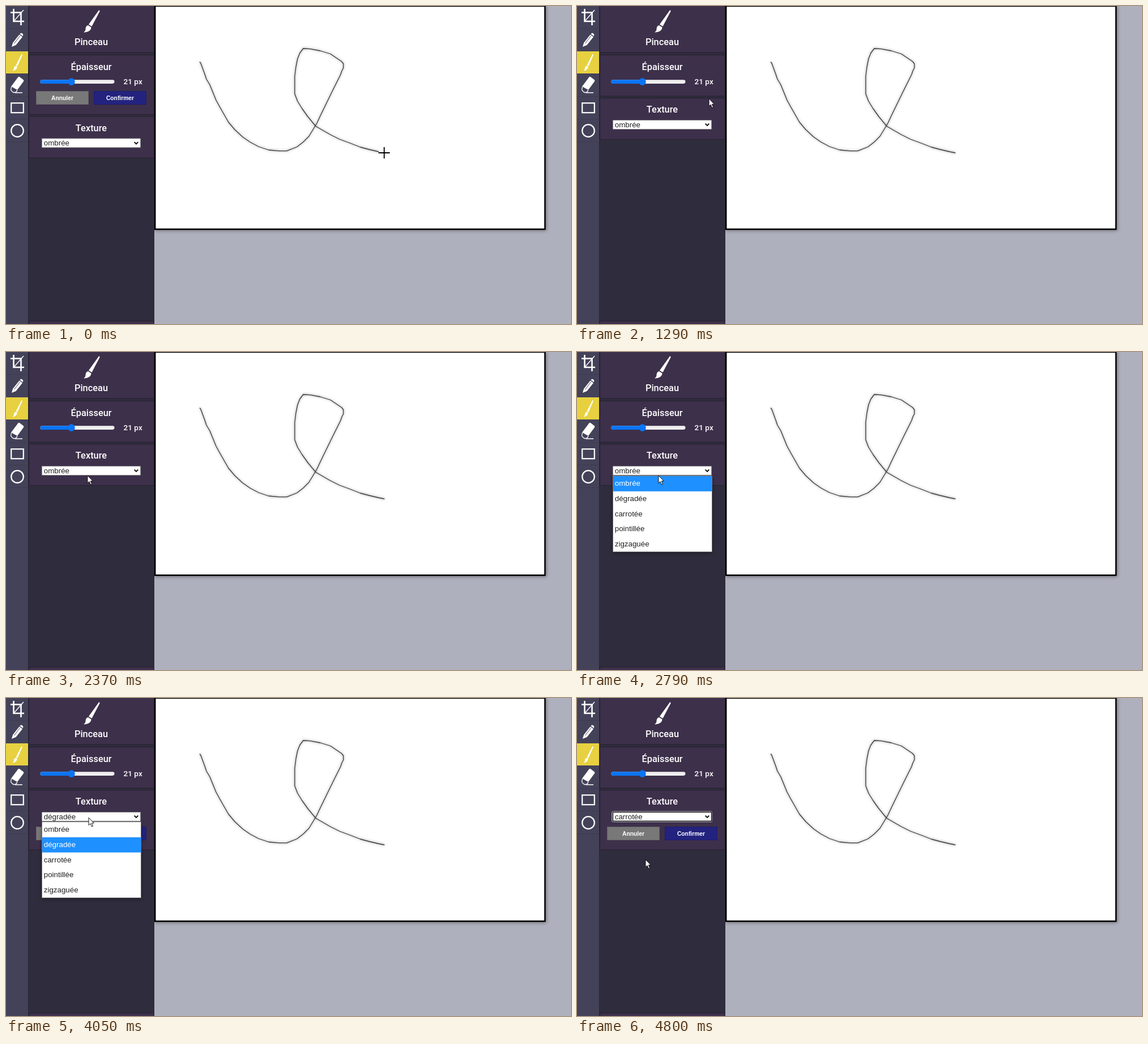
Write an HTML page that moves like this. It is 998 by 561 pixels and loops after 4.89 s.

```html
<!DOCTYPE html>
<html lang="fr">
<head>
<meta charset="utf-8">
<style>
  html, body { margin: 0; width: 100%; height: 100%; overflow: hidden; background: #afb0bd; }
  svg { display: block; }
  .title { font: 500 16.4px Roboto, sans-serif; fill: #fff; text-anchor: middle; }
  .value { font: 500 13.6px Roboto, sans-serif; fill: #fff; }
  .button { font: bold 10.3px "Liberation Sans", Arial, sans-serif; fill: #fff; text-anchor: middle; }
  .item { font: 13.33px "Liberation Sans", Arial, sans-serif; fill: #222; }
  .block { fill: #3d304b; stroke: #241f2e; stroke-width: 1; }
  .line { fill: none; stroke: #fff; }
  #stroke { fill: none; stroke: #383838; stroke-width: 1.3; stroke-linejoin: round; stroke-linecap: round;
    filter: drop-shadow(0 0 2px rgba(0, 0, 0, .55)); }
  #list { filter: drop-shadow(0 2px 3px rgba(0, 0, 0, .35)); }
  #sheet { filter: drop-shadow(1px 1px 3px rgba(0, 0, 0, .4)); }
</style>
</head>
<body>
<svg width="998" height="561" viewBox="0 0 998 561">
  <defs>
    <g id="buttons">
      <rect x="53.5" y="150.5" width="92" height="23" fill="#787878" stroke="#656565"/>
      <rect class="confirm" x="155.5" y="150.5" width="92" height="23" fill="#23237f" stroke="#1c1c6b"/>
      <text class="button" x="99.5" y="165.5">Annuler</text>
      <text class="button" x="201.5" y="165.5">Confirmer</text>
    </g>
  </defs>

  <rect width="998" height="561" fill="#afb0bd"/>
  <rect id="sheet" x="263.2" y="0" width="688.8" height="393.8" fill="#fff" stroke="#000" stroke-width="2.6"/>
  <path id="stroke"/>

  <rect x="39" width="223" height="561" fill="#2f2d3d"/>
  <rect width="39" height="561" fill="#444259"/>
  <path d="M0 39.5H39M0 159.5H39M0 199.5H39M0 239.5H39" stroke="#3c3a50"/>
  <rect y="80" width="39" height="39" fill="#e7d140"/>
  <path d="M39.5 0V561" stroke="#292636"/>
  <path d="M261.5 0V561" stroke="#292636"/>

  <!-- tool icons -->
  <path class="line" stroke-width="2.6" d="M13.5 5V27H32M8 11.5H26.5V34"/>
  <path class="line" stroke-width="1.4" d="M14 26.5L31 7"/>
  <path d="M10 72L12 65L23.5 50.5L29 54.5L17.5 69Z M24.5 49.5L26 47.8Q29 47 30.3 50.5L29.8 53.3Z" fill="#fff"/>
  <path d="M14.5 66L24.5 53" stroke="#444259" stroke-width="1"/>
  <path d="M27.5 85L29 86L20.5 106L17.5 104.5Z M17 105.5L20 107Q18.5 114 11.5 114.5Q14.5 111.5 14 109Q14.5 106 17 105.5Z" fill="#fff"/>
  <path d="M9 142L21 126Q22.5 124 24.5 125.5L30.5 130Q32 131.5 31 133L20 148Z" fill="#fff"/>
  <path class="line" stroke-width="1.3" d="M9.5 142.5L8.7 147Q8.5 149 10.5 150.5L13 152.5H17L20 148.5M16 153H29"/>
  <rect class="line" x="9.2" y="171.2" width="21.6" height="17" stroke-width="2.2"/>
  <circle class="line" cx="20" cy="220" r="10.8" stroke-width="2.2"/>

  <!-- settings -->
  <rect class="block" x="40.5" y="-2" width="221" height="84"/>
  <path d="M164 7.5Q166 7 165.5 9.5L151.5 36L146 32.5Z M145 34L150.5 37.5Q150 46 137 46.5Q141 43.5 140.5 40Q141 35 145 34Z" fill="#fff"/>
  <text class="title" x="150.5" y="69">Pinceau</text>
  <rect class="block" x="40.5" y="555.5" width="221" height="10"/>

  <rect id="sizeBlock" class="block" x="40.5" y="86.5" width="221" height="105"/>
  <text class="title" x="150.5" y="113">Épaisseur</text>
  <rect x="60.5" y="130.3" width="131" height="6.6" rx="3.3" fill="#efefef"/>
  <rect x="60.5" y="130.3" width="56" height="6.6" rx="3.3" fill="#0b75f5"/>
  <circle cx="115.5" cy="133.6" r="6.3" fill="#0b75f5"/>
  <text class="value" x="207.5" y="138.2">21 px</text>
  <use id="sizeButtons" href="#buttons"/>

  <g id="texture">
    <rect id="textureBlock" class="block" x="40.5" y="162.5" width="221" height="73"/>
    <text class="title" x="150.5" y="188">Texture</text>
    <use id="textureButtons" href="#buttons" y="77"/>
    <rect id="ring" x="61.5" y="199.7" width="177.5" height="19" rx="2.5" fill="#fff"/>
    <rect id="field" x="63.3" y="201.3" width="174.4" height="16" fill="#fff"/>
    <text id="choice" class="item" x="66.8" y="213.7"></text>
    <path d="M226.7 207.5L230 210.9L233.3 207.5" fill="none" stroke="#111" stroke-width="1.9"/>
  </g>

  <g id="list">
    <rect x="63.5" y="218.5" width="175" height="134" fill="#fff" stroke="#767676"/>
    <rect id="mark" x="64" width="174.5" height="26.8" fill="#1e90ff"/>
    <g id="items"></g>
  </g>

  <path id="cross" class="line" stroke-width="1.8" style="stroke:#000" d="M-10 0H10M0 -10V10"/>
  <path id="arrow" d="M0 0V13.4L3.1 10.6L5.4 16L7.6 15L5.3 9.8H9.4Z" fill="#fff" stroke="#000" stroke-width=".9"/>
</svg>
<script>
const LOOP = 4890;
const $ = id => document.getElementById(id);
const show = (id, on) => $(id).setAttribute('display', on ? 'inline' : 'none');
const set = (id, attrs) => { for (const k in attrs) $(id).setAttribute(k, attrs[k]); };

const textures = ['ombrée', 'dégradée', 'carrotée', 'pointillée', 'zigzaguée'];
const rowTop = i => 219 + 26.7 * i;
const labels = textures.map((name, i) => {
  const label = document.createElementNS('http://www.w3.org/2000/svg', 'text');
  label.setAttribute('class', 'item');
  label.setAttribute('x', 66.8);
  label.setAttribute('y', rowTop(i) + 17.3);
  label.textContent = name;
  $('items').append(label);
  return label;
});

const drawn = 'M342.5 99L344 101L351 120L354 129L360 139L371 166L377 177L393 205L404 218L418 231L431 240' +
  'L446 248L464 254L482 255.7L496 255.7L514 248.5L525 240L535 230L549 207L556 192L577 149L591 121L593 115L596 109' +
  'L596 102L593 98L573 84.5L555 79L537 75.7L525 75L519 83L515 93L512 108L510 124L510 155L515 168' +
  'L523 181L533 195L547 212L559 219L573 227L589 235L608 242L626 249L641 253L658 257';

// pointer moves: start, end, x, y
const moves = [
  [0, 0, 668, 259], [180, 660, 227, 171], [690, 780, 219, 160],
  [1230, 1740, 577, 248], [1830, 1860, 575, 246], [1860, 2370, 144, 218],
  [2850, 3330, 129, 256], [3540, 3930, 146, 211], [4110, 4600, 121, 285]
];
const CONFIRMED = 930, PICKED = 3420, REPICKED = 4650;

function pointer(t) {
  let x = 0, y = 0;
  for (const [start, end, tx, ty] of moves) {
    if (t < start) break;
    const u = end > start ? Math.min(1, (t - start) / (end - start)) : 1;
    const e = u * u * (3 - 2 * u);
    x += (tx - x) * e;
    y += (ty - y) * e;
  }
  return [x, y];
}

function render(t) {
  const [x, y] = pointer(t);
  const confirmed = t >= CONFIRMED;
  const picked = t >= PICKED;
  const open = (t >= 2460 && t < PICKED) || (t >= 3960 && t < REPICKED);
  const current = t >= REPICKED ? 2 : picked ? 1 : 0;
  const overConfirm = !confirmed && x < 249 && x > 154;

  set('stroke', { d: drawn + (t >= 30 ? 'L668 259' : '') });
  set('sizeBlock', { height: confirmed ? 72.5 : 105 });
  show('sizeButtons', !confirmed);
  document.querySelector('.confirm').setAttribute('fill', overConfirm ? '#202074' : '#23237f');
  set('texture', { transform: `translate(0 ${confirmed ? 0 : 32.5})` });
  set('textureBlock', { height: picked ? 105.5 : 73 });
  show('textureButtons', picked);

  const focused = picked && !open;
  show('ring', focused);
  set('field', { stroke: focused ? '#101010' : '#767676', 'stroke-width': focused ? 1.6 : 0.8 });
  $('choice').textContent = textures[current];

  show('list', open);
  const hovered = y >= 219 ? Math.floor((y - 219) / 26.7) : current;
  set('mark', { y: rowTop(hovered) });
  labels.forEach((label, i) => { label.style.fill = i === hovered ? '#fff' : '#222'; });

  const onSheet = x > 262;
  show('cross', onSheet);
  show('arrow', !onSheet);
  set(onSheet ? 'cross' : 'arrow', { transform: `translate(${x.toFixed(1)} ${y.toFixed(1)})` });
}

const origin = performance.now();
function tick() {
  render((performance.now() - origin) % LOOP);
  requestAnimationFrame(tick);
}
tick();
</script>
</body>
</html>
```
